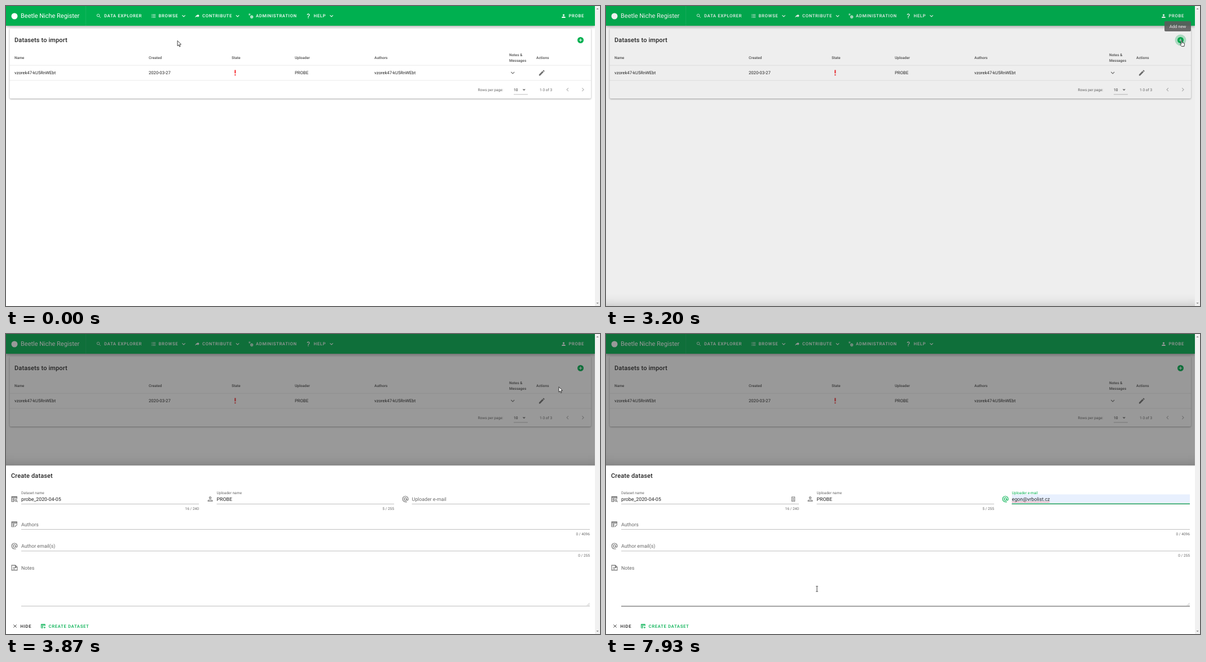
An HTML page with a canvas for the animation above (8 s loop, 1053 px wide and 532 px high).

```html
<!DOCTYPE html>
<html lang="en">
<head>
<meta charset="utf-8">
<title>Dataset import</title>
<style>
  html, body { margin: 0; width: 100%; height: 100%; overflow: hidden; background: #fff; }
  canvas { display: block; width: 1053px; height: 532px; }
</style>
</head>
<body>
<canvas id="stage"></canvas>
<script>
const W = 1053, H = 532, PAGE = 1044, LOOP = 8000, STEP = 200 / 3;
const GREEN = '#00b050', INK = 'rgba(0,0,0,.87)', SOFT = 'rgba(0,0,0,.6)', ICON = 'rgba(0,0,0,.56)';
const USER = 'PROBE', ROW = 'vzorek47-kU5RnWEbt', MAIL = 'egon@vrbolist.cz';
const SMALL = 6.58, BODY = 7.68, INPUT = 8.77, TITLE = 10.97;
const UI = 'Roboto, sans-serif', SYSTEM = '"Open Sans", sans-serif';

const canvas = document.getElementById('stage');
const ctx = canvas.getContext('2d');
const dpr = window.devicePixelRatio || 1;
canvas.width = W * dpr;
canvas.height = H * dpr;

// Icons live in a 24 x 24 box.
const filled = {
  share: 'M21,11L14,4V8C7,9 4,14 3,19C5.5,15.5 9,13.9 14,13.9V18Z',
  down: 'M7.41,8.58L12,13.17L16.59,8.58L18,10L12,16L6,10Z',
  left: 'M15.41,16.58L10.83,12L15.41,7.41L14,6L8,12L14,18Z',
  right: 'M8.59,16.58L13.17,12L8.59,7.41L10,6L16,12L10,18Z',
  caret: 'M7,10L12,15L17,10Z',
  person: 'M12,4a4,4 0 0,1 0,8a4,4 0 0,1 0,-8M12,14C16.42,14 20,15.79 20,18V20H4V18C4,15.79 7.58,14 12,14Z',
  help: 'M10,19H13V22H10ZM12,2C17.35,2.22 19.68,7.62 16.5,11.67C15.67,12.67 14.33,13.33 13.67,14.17C13,15 13,16 13,17H10C10,15.33 10,13.92 10.67,12.92C11.33,11.92 12.67,11.33 13.5,10.67C15.92,8.43 15.32,5.26 12,5A3,3 0 0,0 9,8H6A6,6 0 0,1 12,2Z',
  add: 'M17,13H13V17H11V13H7V11H11V7H13V11H17M12,2A10,10 0 0,0 2,12A10,10 0 0,0 12,22A10,10 0 0,0 22,12A10,10 0 0,0 12,2Z',
  alert: 'M10,3H14V14H10ZM10,21V17H14V21Z',
  pencil: 'M20.71,7.04C21.1,6.65 21.1,6 20.71,5.63L18.37,3.29C18,2.9 17.35,2.9 16.96,3.29L15.12,5.12L18.87,8.87M3,17.25V21H6.75L17.81,9.93L14.06,6.18Z'
};
const table = 'M11,20H3V4H20V11M3,5.5H20M3,9H20M9.5,9V20M3,14.5H12';
const lined = {
  search: 'M15,9.5a5.5,5.5 0 1,1 -11,0a5.5,5.5 0 1,1 11,0M13.6,13.6L19.8,19.8',
  list: 'M7,6H21M7,12H21M7,18H21M2.7,6H5.3M2.7,12H5.3M2.7,18H5.3',
  at: 'M16,12a4,4 0 1,1 -8,0a4,4 0 1,1 8,0V13.4a2.5,2.5 0 0,0 5,0V12a9,9 0 1,0 -9,9h5',
  user: 'M15,8a3,3 0 1,1 -6,0a3,3 0 1,1 6,0M5,19V17.5C5,14 19,14 19,17.5V19Z',
  note: 'M3,4H15L21,10V20H3ZM7,12H17M7,16H14M14.5,4V10H21',
  close: 'M5.5,5.5L18.5,18.5M18.5,5.5L5.5,18.5',
  tableSearch: table + 'M19.5,16a3,3 0 1,1 -6,0a3,3 0 1,1 6,0M19,18.5L22,21.5',
  tableEdit: table + 'M13,20.5L21,12.5',
  tablePlus: table + 'M18,14V22M14,18H22'
};
for (const set of [filled, lined])
  for (const name in set) set[name] = new Path2D(set[name]);

const clamp = v => Math.max(0, Math.min(1, v));
const mix = (a, b, p) => a + (b - a) * p;

// cubic-bezier(.25, .8, .5, 1)
function ease(p) {
  if (p <= 0) return 0;
  if (p >= 1) return 1;
  let lo = 0, hi = 1;
  for (let i = 0; i < 20; i++) {
    const u = (lo + hi) / 2, v = 1 - u;
    if (.75 * u * v * v + 1.5 * u * u * v + u * u * u < p) lo = u; else hi = u;
  }
  const v = 1 - lo;
  return 2.4 * lo * v * v + 3 * lo * lo * v + lo ** 3;
}
const since = (t, start, span = 300) => ease((t - start) / span);

function text(s, x, y, size = BODY, color = INK, { weight = 400, gap = 0, align = 'left', font = UI } = {}) {
  ctx.font = `${weight} ${size}px ${font}`;
  ctx.letterSpacing = gap * size + 'px';
  ctx.textAlign = align;
  ctx.fillStyle = color;
  ctx.fillText(s, x, y + size * .355);
}
const heading = (s, x, y) => text(s, x, y, TITLE, INK, { weight: 500, gap: .0125 });
const button = (s, x, y, color) => text(s, x, y, BODY, color, { weight: 500, gap: .0893 });

function rect(x, y, w, h, color) {
  ctx.fillStyle = color;
  ctx.fillRect(x, y, w, h);
}

function disc(x, y, r, color) {
  ctx.fillStyle = color;
  ctx.beginPath();
  ctx.arc(x, y, r, 0, 7);
  ctx.fill();
}

function icon(name, x, y, color, px = 24) {
  const k = px / 24 * .5484;
  ctx.save();
  ctx.translate(x - 12 * k, y - 12 * k);
  ctx.scale(k, k);
  ctx.fillStyle = ctx.strokeStyle = color;
  ctx.lineWidth = 2;
  if (filled[name]) ctx.fill(filled[name], 'evenodd');
  else ctx.stroke(lined[name]);
  ctx.restore();
}

function gear(x, y, r) {
  ctx.strokeStyle = '#fff';
  ctx.lineWidth = r * .6;
  ctx.beginPath();
  ctx.arc(x, y, r * .75, 0, 7);
  ctx.stroke();
  for (let i = 0; i < 8; i++) {
    const a = i * Math.PI / 4;
    ctx.beginPath();
    ctx.moveTo(x + r * Math.cos(a), y + r * Math.sin(a));
    ctx.lineTo(x + r * 1.4 * Math.cos(a), y + r * 1.4 * Math.sin(a));
    ctx.stroke();
  }
}

function box(x, y, w, h, r, color, blur, dy, shade) {
  ctx.save();
  ctx.shadowColor = `rgba(0,0,0,${shade})`;
  ctx.shadowBlur = blur * dpr;
  ctx.shadowOffsetY = dy * dpr;
  ctx.fillStyle = color;
  ctx.beginPath();
  ctx.roundRect(x, y, w, h, r);
  ctx.fill();
  ctx.restore();
}

function header() {
  box(0, -10, PAGE, 45, 0, GREEN, 5, 1.8, .38);
  disc(15, 18, 5.5, '#fff');
  text('Beetle Niche Register', 26, 17.6, TITLE, '#fff');
  rect(141, 0, .6, 35, 'rgba(255,255,255,.14)');
  const nav = [['search', 164.5, 'DATA EXPLORER', 174], ['list', 261.5, 'BROWSE', 270.5, 315],
    ['share', 339, 'CONTRIBUTE', 348, 410.5], ['', 0, 'ADMINISTRATION', 443],
    ['help', 536, 'HELP', 545.5, 577], ['person', 988.5, USER, 997.5]];
  for (const [name, x, label, tx, arrow] of nav) {
    if (name) icon(name, x, 17.7, '#fff', 18);
    button(label, tx, 17.6, '#fff');
    if (arrow) icon('down', arrow, 17.7, '#fff', 22);
  }
  gear(435.6, 19.4, 2);
  gear(431.7, 15, 1.2);
}

function list(t) {
  box(6.5, 39.5, 1030.5, 124.5, 2, '#fff', 3, 1.1, .36);
  heading('Datasets to import', 15, 60.6);

  const ring = .08 * since(t, 2530, 150) * (1 - since(t, 3200)) +
    .2 * since(t, 2860, 150) * (1 - since(t, 3200, 400));
  if (ring > 0) disc(1018.5, 60.5, 9.9, `rgba(0,176,80,${ring})`);
  icon('add', 1018.5, 60.5, GREEN);

  const th = (s, x, y = 91.7) => text(s, x, y, SMALL, SOFT, { weight: 700 });
  th('Name', 15);
  th('Created', 253);
  th('State', 400);
  th('Uploader', 512);
  th('Authors', 653);
  th('Notes &', 892, 86.7);
  th('Messages', 892, 96.7);
  th('Actions', 940);
  rect(6.5, 104.8, 1030.5, .6, 'rgba(0,0,0,.14)');
  rect(6.5, 131.7, 1030.5, .6, 'rgba(0,0,0,.14)');

  text(ROW, 15, 118.3);
  text('2020-03-27', 253, 118.3);
  text(USER, 512, 118.3);
  text(ROW, 653, 118.3);
  icon('alert', 406.3, 118.4, '#f5363a');
  icon('down', 898.3, 118.5, ICON);
  icon('pencil', 949.8, 118.5, ICON);

  text('Rows per page:', 836.5, 148.2, SMALL, SOFT);
  text('10', 900, 148.2, SMALL, INK);
  icon('caret', 918.3, 148.5, ICON);
  rect(900, 156.6, 25, .6, 'rgba(0,0,0,.42)');
  text('1-3 of 3', 946, 148.2, SMALL, SOFT);
  icon('left', 995.5, 148.3, 'rgba(0,0,0,.3)');
  icon('right', 1022.7, 148.3, 'rgba(0,0,0,.3)');
}

function tooltip(t) {
  const a = since(t, 2530, 150) * (1 - clamp((t - 3200) / 110));
  if (a <= 0) return;
  ctx.globalAlpha = a;
  box(990, 27, 47, 18, 2, 'rgba(97,97,97,.9)', 0, 0, 0);
  text('Add new', 1013.5, 36, BODY, '#fff', { align: 'center' });
  ctx.globalAlpha = 1;
}

function line(x, y, right, hover = 0) {
  rect(x, y, right - x, .6 + hover * .2, `rgba(0,0,0,${.42 + .45 * hover})`);
}
const count = (s, x, y) => text(s, x, y, SMALL, SOFT, { align: 'right' });
const passing = (t, a, b) => Math.min(since(t, a), 1 - since(t, b));

function mailField(t) {
  const p = since(t, 5260), focused = t >= 5260;
  const filledIn = t >= 7000, preview = t >= 6320 && !filledIn;
  if (preview || filledIn) rect(719.5, 284.4, 315.5, 16.6, '#e8f0fe');
  line(719.5, 301, 1035, since(t, 4730));
  icon('at', 708, 292.7, focused ? GREEN : ICON);
  text('Uploader e-mail', 719.5, mix(292.6, 281.3, p), mix(INPUT, SMALL, p), focused ? GREEN : SOFT);
  if (p > 0) rect(877.25 - 157.75 * p, 300.6, 315.5 * p, 1.1, GREEN);
  if (preview) text(MAIL, 719.8, 293, 7.15, INK, { font: SYSTEM });
  if (filledIn) {
    text(MAIL, 719.5, 292.6, INPUT);
    const end = 719.5 + ctx.measureText(MAIL).width;
    ctx.strokeStyle = '#f03a3a';
    ctx.lineWidth = .6;
    ctx.beginPath();
    for (let x = 719.5; x < end; x += .5) ctx.lineTo(x, 298 + .6 * Math.sin(x * 2.6));
    ctx.stroke();
  }
  if (focused && t < 5795 || t >= 6260 && !filledIn) rect(719.4, 287.5, .6, 10.5, '#000');
}

function panel(t) {
  if (t < 3195) return;
  ctx.save();
  ctx.beginPath();
  ctx.rect(0, 0, PAGE, H);
  ctx.clip();
  ctx.translate(0, 299 * (1 - since(t, 3200, 215)));
  box(-20, 233.3, PAGE + 40, 340, 0, '#fff', 22, 3, .3);
  heading('Create dataset', 9, 251.2);

  icon('tableSearch', 15, 292.7, ICON);
  text('Dataset name', 27, 281.3, SMALL, SOFT);
  text('probe_2020-04-05', 27, 292.6, INPUT);
  line(27, 301, 342);
  count('16 / 240', 342, 309.2);
  if (t >= 3995) {
    ctx.strokeStyle = '#555';
    ctx.lineWidth = .8;
    ctx.strokeRect(329.3, 289, 5.4, 7.6);
    for (const y of [291, 292.7, 294.4]) rect(330.8, y - .3, 2.4, .8, '#555');
  }

  icon('user', 362, 292.7, ICON);
  text('Uploader name', 373.5, 281.3, SMALL, SOFT);
  text(USER, 373.5, 292.6, INPUT);
  line(373.5, 301, 688);
  count('5 / 255', 688, 309.2);

  mailField(t);

  icon('tableEdit', 15, 337.4, ICON);
  text('Authors', 27, 337.6, INPUT, SOFT);
  line(27, 346.1, 1035, passing(t, 7130, 7260));
  count('0 / 4096', 1035, 354.2);
  icon('at', 15, 376, ICON);
  text('Author email(s)', 27, 376.1, INPUT, SOFT);
  line(27, 384.6, 1035, passing(t, 7390, 7520));
  count('0 / 255', 1035, 392.6);
  icon('note', 15, 414.5, ICON);
  text('Notes', 27, 414.5, INPUT, SOFT);
  line(27, 482.4, 1035, since(t, 7650));
  ctx.strokeStyle = 'rgba(0,0,0,.5)';
  ctx.lineWidth = .5;
  ctx.beginPath();
  for (const d of [4.5, 2]) {
    ctx.moveTo(1034.5 - d, 481.5);
    ctx.lineTo(1034.5, 481.5 - d);
  }
  ctx.stroke();

  icon('close', 16, 518, INK, 18);
  button('HIDE', 25.5, 518, INK);
  icon('tablePlus', 66, 518, GREEN, 18);
  button('CREATE DATASET', 75.5, 518, GREEN);
  ctx.restore();
}

function suggestions(t) {
  if (t < 5395 || t >= 7000) return;
  box(719.5, 306.3, 105.5, 86.5, 0, '#fff', 3, 1, .4);
  rect(719.5, 370.5, 105.5, 22.3, '#f6f8fa');
  rect(719.5, 370.3, 105.5, .6, '#dcdfe3');
  if (t >= 6320) rect(719.5, 306.3, 105.5, 19.7, '#c8c8c8');
  const names = [MAIL, 'egon.zubrik@ukl.tovi.cz', 'ezubrik@mail.tovi.cz'];
  names.forEach((s, i) => text(s, 726, 316.5 + 19.8 * i, 6.75, '#2b2420', { weight: 600, font: SYSTEM }));
  text('Spravovat…', 726, 381.7, 6.6, '#333', { font: SYSTEM });
}

function scrollbar() {
  rect(PAGE, 0, W - PAGE, H, '#f1f1f1');
  ctx.fillStyle = '#8b8b8b';
  for (const [y, d] of [[6, -2.2], [526, 2.2]]) {
    ctx.beginPath();
    ctx.moveTo(1046.4, y);
    ctx.lineTo(1050.8, y);
    ctx.lineTo(1048.6, y + d);
    ctx.fill();
  }
}

// time, x, y
const route = [
  [400, 304, 61.5], [600, 335, 64], [1270, 701.5, 75.5], [1400, 770, 77], [1667, 905, 72],
  [1735, 905, 72], [2133, 977.5, 68], [2600, 1016, 62], [2733, 1020.5, 61], [3733, 1020.5, 61],
  [3933, 960, 110], [4333, 790, 235], [4600, 745, 268], [4667, 745, 268], [4867, 743, 281.3],
  [5133, 745, 290], [6200, 745, 290], [6467, 745.5, 310.3], [6667, 745.5, 317], [7067, 745.5, 317],
  [7800, 425, 431], [7933, 374, 452]
];

function pointerAt(t) {
  let i = 0;
  while (i < route.length - 2 && t > route[i + 1][0]) i++;
  const a = route[i], b = route[i + 1], p = clamp((t - a[0]) / (b[0] - a[0]));
  return [mix(a[1], b[1], p), mix(a[2], b[2], p)];
}

const arrow = new Path2D('M0,0V9.3L2.1,7.4L3.5,10.7L5,10.1L3.6,6.9L6.4,6.6Z');
const hand = new Path2D('M-.8,.7A.8,.8 0 0,1 .8,.7V4L4.4,4.9Q5.3,5.2 5.1,6.3L4.4,10.6H0L-3,7.2Q-2.5,5.8 -.8,7.1Z');
const beam = new Path2D('M-1.8,-4.7H-.5L0,-4.3L.5,-4.7H1.8M-1.8,4.7H-.5L0,4.3L.5,4.7H1.8M0,-4.3V4.3');

function pointer(t) {
  const within = (a, b) => t >= a && t < b;
  const typing = within(4900, 6300) || within(7130, 7260) || within(7390, 7520) || t >= 7650;
  const shape = typing ? beam : within(2530, 3795) ? hand : arrow;
  ctx.save();
  ctx.translate(...pointerAt(t));
  ctx.lineJoin = 'round';
  ctx.lineWidth = .8;
  ctx.fillStyle = '#fff';
  ctx.strokeStyle = '#111';
  if (!typing) ctx.fill(shape);
  ctx.stroke(shape);
  ctx.restore();
}

function draw(t) {
  ctx.setTransform(dpr, 0, 0, dpr, 0, 0);
  ctx.textBaseline = 'alphabetic';
  ctx.textRendering = 'geometricPrecision';
  rect(0, 0, W, H, '#fff');
  list(t);
  header();
  tooltip(t);
  if (t > 3184) rect(0, 0, PAGE, H, `rgba(33,33,33,${.46 * since(t, 3184)})`);
  panel(t);
  suggestions(t);
  scrollbar();
  pointer(t);
}

function tick() {
  const t = performance.now() % LOOP;
  draw(Math.floor((t + 5) / STEP) * STEP);
  requestAnimationFrame(tick);
}
tick();
</script>
</body>
</html>
```
